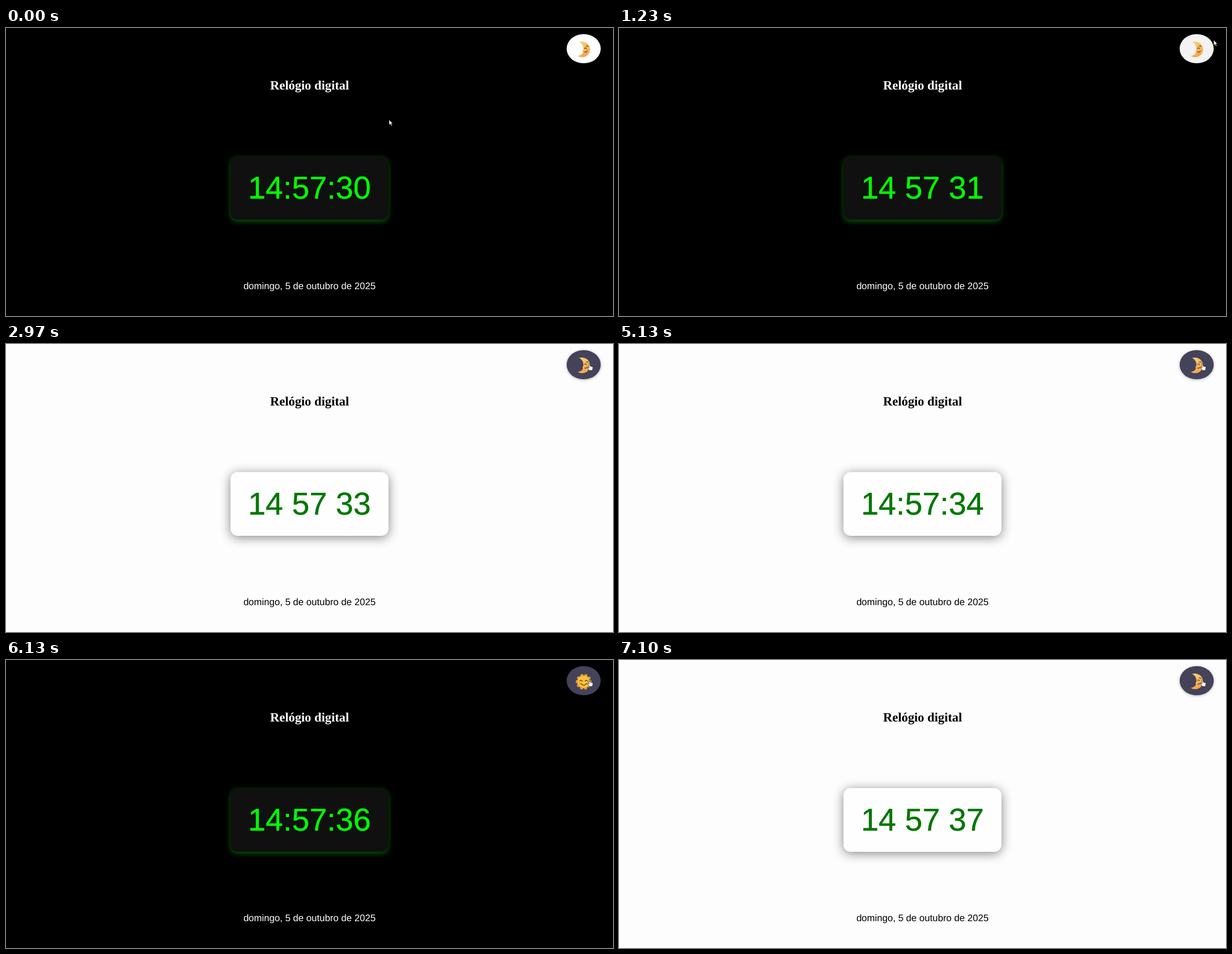
These frames come from a looping animation (1087x515 px, 8 s). An HTML page:

```html
<!DOCTYPE html>
<html lang="pt-BR">
<head>
<meta charset="utf-8">
<title>Relógio digital</title>
<style>
  html, body { margin: 0; width: 100%; height: 100%; overflow: hidden; }
  body { position: relative; background: #000; }
  body.light { background: #fdfdfd; }
  div, svg { position: absolute; }
  svg { left: 0; top: 0; }
  text { text-anchor: middle; text-rendering: geometricPrecision; fill: #fff; }
  .light text { fill: #000; }
  .sans { font-family: "Liberation Sans", Arial, sans-serif; }
  .title { font: bold 22.8px "Liberation Serif", "Times New Roman", serif; }
  text#clock { fill: #0f0; stroke: #0f0; stroke-width: .4; }
  .light text#clock { fill: #007600; stroke: #007600; }
  #panel {
    left: 402px; top: 229px; width: 283px; height: 113.5px; border-radius: 13px;
    background: #101010; box-shadow: 0 3px 10px rgba(0, 255, 0, .36);
  }
  .light #panel { background: #fefefe; box-shadow: 0 3px 19px rgba(0, 0, 0, .48); }
  #button { left: 1004px; top: 10.5px; width: 60.5px; height: 52.5px; border-radius: 50%; }
  .light #button { box-shadow: 0 1px 5px rgba(0, 0, 0, .3); }
  .face { fill: none; stroke: #6b3f1d; stroke-width: 1.3; stroke-linecap: round; }
</style>
</head>
<body>
<div id="panel"></div>
<div id="button"></div>
<svg width="1087" height="515">
  <defs>
    <linearGradient id="gold" x1="0" y1="0" x2=".4" y2="1">
      <stop offset="0" stop-color="#fbd277"/>
      <stop offset="1" stop-color="#f4a550"/>
    </linearGradient>
  </defs>
  <text class="title" x="543.7" y="110.3">Relógio digital</text>
  <text class="sans" id="clock" x="543.4" y="304.8" font-size="56.5"></text>
  <text class="sans" x="543.5" y="467" font-size="17.05">domingo, 5 de outubro de 2025</text>
  <g id="moon">
    <path fill="url(#gold)" d="M1026 25C1038 22 1046 30 1046 38.500C1046 49 1034 56 1024 50C1029 49 1032 47 1033 44.500L1032.500 41.500L1034 38C1034 31 1031 27 1026 25Z"/>
    <path class="face" d="M1036 36.500q2-2 3.500 .5M1039 32.500q2-1.500 3.500 .5M1036 43q3.500 1 5-2"/>
  </g>
  <g id="sun">
    <circle cx="1034.500" cy="39" r="11.300" fill="#e8983a" stroke="#e8983a" stroke-width="6" stroke-linecap="round" stroke-dasharray="0 7.1"/>
    <circle cx="1034.500" cy="39" r="10.800" fill="#fac437"/>
    <circle cx="1028" cy="42" r="2" fill="#f39a3d"/>
    <circle cx="1041" cy="42" r="2" fill="#f39a3d"/>
    <path class="face" d="M1027.500 38q2-3.500 4.500 0M1037 38q2-3.500 4.500 0M1029.500 42.500q5 5 10 0"/>
  </g>
  <g id="cursor" fill="#fff" stroke="#111" stroke-width=".7" stroke-linejoin="round">
    <path id="arrow" d="M0 0V9.500L2.200 7.500L3.800 11.200L5.400 10.500L3.800 6.900H6.600Z"/>
    <path id="hand" d="M-1 .8Q0-.7 1 .8V5L5.200 6Q6.300 6.400 6.100 7.800L5.200 12.800H-.2L-3.600 8.300Q-3.700 6.800-2.300 7.200L-1 8.300Z"/>
  </g>
</svg>
<script>
const $ = id => document.getElementById(id);
const show = (id, on) => $(id).style.display = on ? "" : "none";

const ticks = [1000, 2130, 2970, 3730, 5200, 5870, 6870];
const themeSwitches = [2970, 5200, 6600];
const path = [[470, 686, 164], [1210, 1065, 21.5], [1290, 1065, 21.5], [1700, 1045, 34.5]];
const hover = [[1080, 0], [1140, .065], [1300, .065], [1650, 1]];

const passed = (times, t) => times.filter(s => t >= s).length;

// Eased value of column c between rows of [time, ...values]
function at(rows, t, c) {
  if (t <= rows[0][0]) return rows[0][c];
  for (let i = 1; i < rows.length; i++) {
    const a = rows[i - 1], b = rows[i];
    if (t < b[0]) {
      const p = (t - a[0]) / (b[0] - a[0]);
      return a[c] + (b[c] - a[c]) * p * p * (3 - 2 * p);
    }
  }
  return rows[rows.length - 1][c];
}

function draw(now) {
  const t = now % 8000;
  const seconds = 30 + passed(ticks, t);
  const switches = passed(themeSwitches, t);
  const sep = seconds % 2 ? " " : ":";
  $("clock").textContent = ["14", "57", seconds].join(sep);
  document.body.className = switches % 2 ? "light" : "";
  show("sun", switches === 2);
  show("moon", switches !== 2);

  const h = at(hover, t, 1);
  const mix = [68, 67, 90].map(v => Math.round(255 + (v - 255) * h));
  $("button").style.background = `rgb(${mix})`;

  const x = at(path, t, 1), y = at(path, t, 2);
  const inside = Math.hypot((x - 1034) / 30, (y - 37) / 26) < 1;
  $("cursor").setAttribute("transform", `translate(${x} ${y})`);
  show("hand", inside);
  show("arrow", !inside);
  requestAnimationFrame(draw);
}
draw(performance.now());
</script>
</body>
</html>
```
